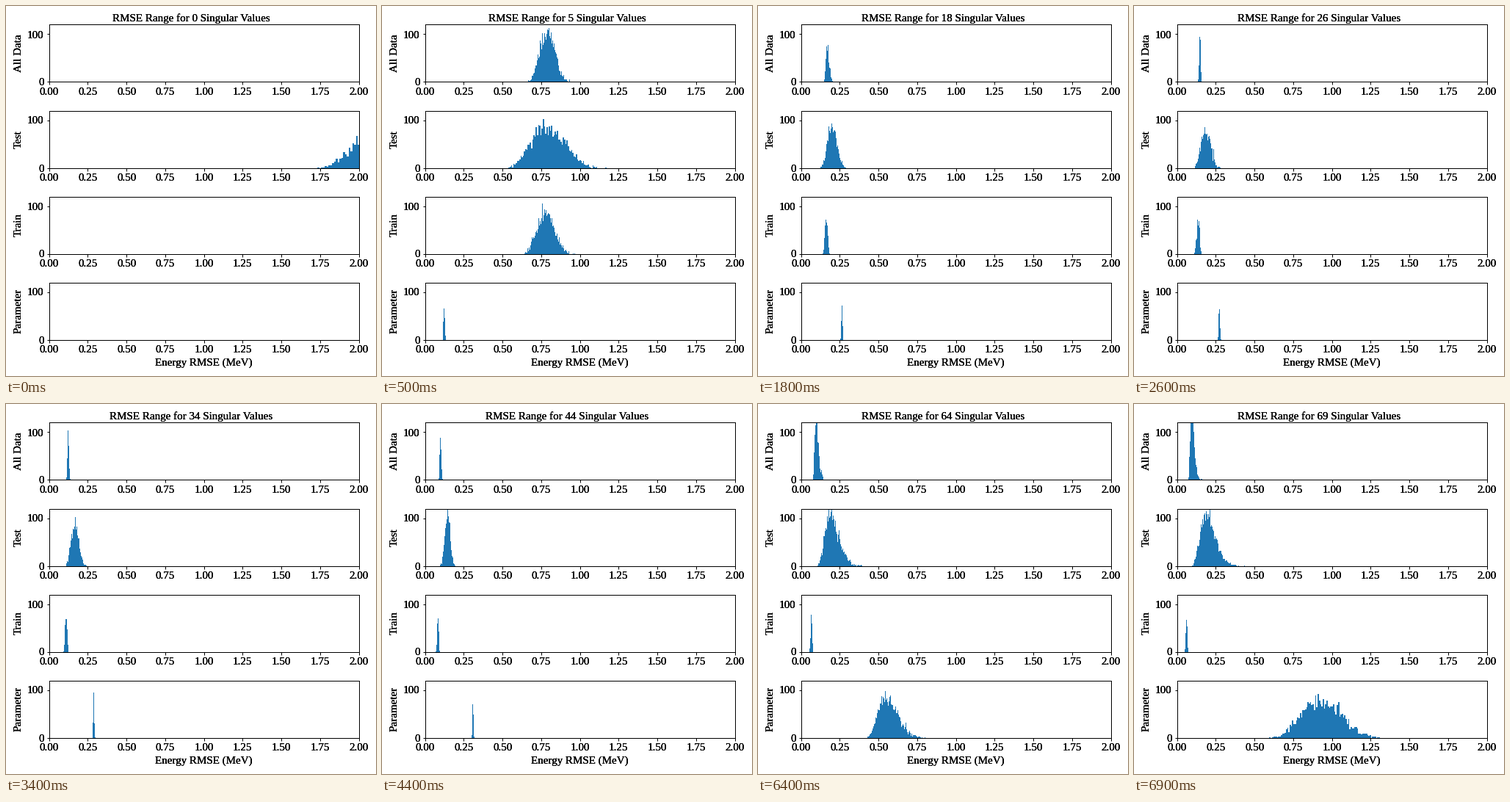
Recreate the animation shown at these times as a matplotlib script. Size 504 by 504 pixels, loop 7 s.

```python
import numpy as np
import matplotlib.pyplot as plt
from matplotlib.animation import FuncAnimation

SIZE, DPI = 504, 72
LEFT, WIDTH, HEIGHT = 58.5, 422, 78
BOTTOMS = [103.5 + 117 * i for i in range(4)]
FRAMES, SAMPLES, BINS = 70, 3000, 100
BLUE = "#1f77b4"

plt.rcParams.update({"font.family": "Liberation Serif", "font.size": 15})
rng = np.random.default_rng(7)

# Each row: singular values kept, low edge, mode, high edge, peak count
KNOTS = {
    "All Data": [
        (0, 2.1, 2.4, 2.8, 80), (1, 1.1, 1.4, 1.9, 80),
        (10, .295, .385, .485, 132), (18, .148, .171, .215, 72),
        (26, .125, .149, .165, 105), (44, .088, .099, .125, 88),
        (58, .083, .101, .185, 105), (69, .073, .095, .23, 155)],
    "Test": [
        (0, 1.64, 2.15, 2.82, 80), (1, .9, 1.3, 2.1, 75),
        (10, .25, .415, .68, 81), (18, .115, .198, .335, 82),
        (26, .095, .187, .29, 68), (44, .077, .145, .23, 100),
        (58, .1, .188, .47, 104), (69, .092, .19, .515, 108)],
    "Train": [
        (0, 2.1, 2.4, 2.8, 80), (1, 1.1, 1.4, 1.85, 80),
        (10, .28, .376, .46, 84), (18, .138, .164, .195, 72),
        (26, .102, .139, .16, 68), (44, .068, .085, .096, 68),
        (58, .055, .076, .086, 76), (69, .044, .063, .075, 72)],
    "Parameter": [
        (0, 2.1, 2.4, 2.8, 70), (1, .025, .035, .05, 68),
        (4, .1, .11, .125, 68), (10, .21, .223, .241, 68),
        (18, .253, .265, .276, 68), (26, .262, .273, .287, 70),
        (44, .3, .31, .32, 70), (52, .312, .325, .346, 70),
        (58, .325, .362, .455, 95), (64, .42, .55, .85, 80),
        (69, .58, .93, 1.4, 70)],
}
# Share of samples in the second, lower peak seen near ten values
BUMPS = {"All Data": .22, "Train": .15}

fig = plt.figure(figsize=(SIZE / DPI, SIZE / DPI), dpi=DPI, facecolor="white")


def label(x, y, text, **style):
    """Overlay copies so that the thin strokes come out dark."""
    return [fig.text(x / SIZE, 1 - y / SIZE, text, **style) for _ in range(3)]


def make_panel(name, bottom):
    ax = fig.add_axes([LEFT / SIZE, 1 - bottom / SIZE,
                       WIDTH / SIZE, HEIGHT / SIZE])
    ax.set(xlim=(0, 2), ylim=(0, 120),
           xticks=np.linspace(0, 2, 9), yticks=[0, 100])
    ax.tick_params(length=3.5, width=1, labelbottom=False, labelleft=False)
    for spine in ax.spines.values():
        spine.set_linewidth(1)
    for v in np.linspace(0, 2, 9):
        label(LEFT + v * WIDTH / 2, bottom + 17.5, f"{v:.2f}", ha="center")
    for v in (0, 100):
        label(LEFT - 7, bottom - v * HEIGHT / 120, str(v),
              ha="right", va="center_baseline")
    label(21, bottom - HEIGHT / 2, name, rotation=90,
          rotation_mode="anchor", ha="center")
    return ax.stairs(np.zeros(BINS), np.linspace(0, 1, BINS + 1),
                     fill=True, color=BLUE, linewidth=0)


def histogram(name, k):
    knots = np.array(KNOTS[name])
    low, mode, high, peak = (
        np.exp(np.interp(k, knots[:, 0], np.log(col))) for col in knots[:, 1:].T)

    # Beta distribution on [low, high] with the wanted mode and peak
    m = (mode - low) / (high - low)
    sd = SAMPLES / BINS / (np.sqrt(2 * np.pi) * peak)
    c = m * (1 - m) / sd ** 2
    a, b = 1 + c * m, 1 + c * (1 - m)
    z = rng.beta(a, b, SAMPLES)
    if m < .35:
        tail = SAMPLES // 16
        z[:tail] = rng.beta(a, b / 2, tail)

    share = BUMPS.get(name, 0) * max(0, 1 - abs(k - 10) / 4)
    bump = int(share * SAMPLES)
    z[:bump] = rng.normal(m - .22, .045, bump)

    counts, edges = np.histogram(z, BINS, (0, 1))
    return counts, low + edges * (high - low)


# Drawn once up front, so every loop shows the same counts
HISTOGRAMS = {name: [histogram(name, k) for k in range(FRAMES)]
              for name in KNOTS}

panels = {name: make_panel(name, y) for name, y in zip(KNOTS, BOTTOMS)}
titles = label(252, 10.1, "", ha="center", va="top")
label(LEFT + WIDTH / 2, 490, "Energy RMSE (MeV)", ha="center")


def update(k):
    for name, steps in panels.items():
        steps.set_data(*HISTOGRAMS[name][k])
    for title in titles:
        title.set_text(f"RMSE Range for {k} Singular Values")
    return [*panels.values(), *titles]


anim = FuncAnimation(fig, update, frames=FRAMES, interval=100,
                     repeat=True, repeat_delay=0, blit=False)
plt.show()
```
